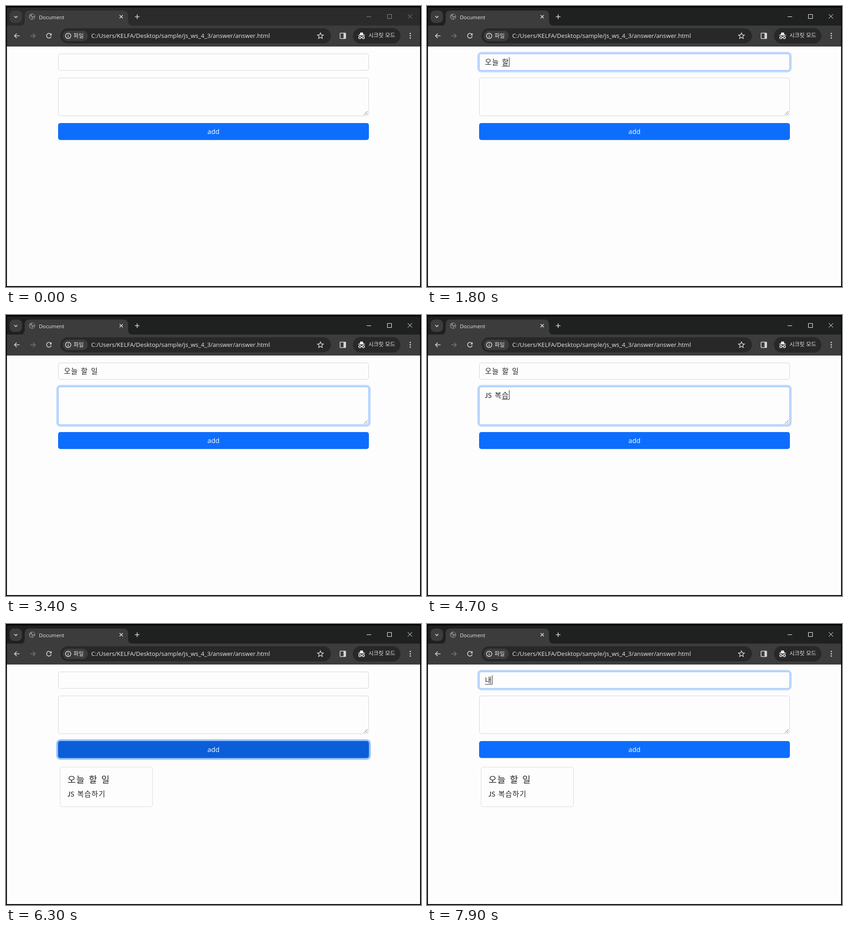
An HTML page that plays this animation: 908 px wide and 617 px high, repeating every 8000 ms.

```html
<!DOCTYPE html>
<html lang="ko">
<head>
<meta charset="utf-8">
<title>Document</title>
<style>
  html, body { margin: 0; width: 100%; height: 100%; overflow: hidden; background: #000; }
  #stage { position: relative; width: 908px; height: 617px; overflow: hidden; background: #000; }
  #view { position: absolute; left: 2px; top: 88px; width: 904px; height: 527px; background: #fdfdfd; }
  #chrome { position: absolute; left: 0; top: 0; }
  #chrome text { font-family: "Open Sans", "Noto Sans CJK KR", sans-serif; fill: #e8e8e8; }
  #chrome .ko { font-family: "Noto Sans CJK KR", "Noto Sans CJK", sans-serif; font-size: 12px; }
  .line { fill: none; stroke: #d6d6d6; stroke-width: 1.6; }

  /* The page is laid out at its natural size and shown slightly reduced. */
  #page { position: absolute; left: 114px; top: 89px; width: 696px; height: 400px;
    transform: scale(.977); transform-origin: 0 0; color: #212529; }
  #page > div { position: absolute; box-sizing: border-box; }
  .field { left: 0; width: 696px; border: 1px solid #ced4da; border-radius: 5px; background: #fdfdfd; padding: 6px 12px; }
  #head { top: 16px; height: 38px; }
  #body { top: 70px; height: 86px; }
  #body svg { position: absolute; right: 0; bottom: 0; }
  #add { left: 0; top: 172px; width: 696px; height: 38px; border-radius: 5px; color: #fff;
    font: 15.1px/24px "Open Sans", sans-serif; text-align: center; padding: 7px 0; }
  #card { left: 4px; top: 230px; width: 208px; height: 90px; border: 1px solid #dadada; border-radius: 5px; padding: 16px; }
  .text { position: relative; top: -.7px; height: 24px; white-space: pre;
    font: 16px/24px "Noto Sans CJK KR", "Noto Sans CJK", sans-serif;
    letter-spacing: .07em; word-spacing: .06em; }
  .text i { font-family: Lato, sans-serif; font-style: normal; letter-spacing: 0; }
  .text u { position: relative; text-decoration: none; display: inline-block; height: 24px; vertical-align: top; }
  .text u::after { content: ""; position: absolute; left: 0; right: 0; top: 22px; height: 1px; background: #212529; }
  .text b { position: relative; display: inline-block; width: 0; height: 24px; vertical-align: top; }
  .text b::after { content: ""; position: absolute; left: 0; top: 2px; width: 1px; height: 21px; background: #111; }
  .big { font-size: 20px; margin-bottom: 8px; }
</style>
</head>
<body>
<div id="stage">
  <div id="view"></div>
  <svg id="chrome" width="908" height="617" viewBox="0 0 908 617">
    <rect id="bar" x="2" y="3" width="904" height="41"/>
    <rect x="2" y="43" width="904" height="46" fill="#3c3c3c"/>
    <rect x="8" y="10" width="27" height="27" rx="9" fill="#3c3c3c"/>
    <path class="line" d="M18 22l3.500 3.500 3.500-3.500"/>
    <path fill="#3c3c3c" d="M31 43q10 0 10-10V20q0-10 10-10H257q10 0 10 10V33q0 10 10 10z"/>
    <circle cx="57" cy="23.500" r="6.700" fill="#80868b"/>
    <path fill="#3c3c3c" d="M52 22l3 1 2 2-1 4-3-2zM57 18l4 1 1 3-3 1-3-2zM59 25l3 0-2 4-2-1z"/>
    <text x="72" y="29" font-size="11.400">Document</text>
    <path class="line" d="M248.500 20l7 7m0-7l-7 7M282 23.500h10m-5-5v10"/>
    <path id="controls" fill="none" stroke-width="1" d="M789 23.500h10M834.500 18.500h9v9h-9zM879 18l9.500 9.500m0-9.500l-9.500 9.500"/>

    <path class="line" d="M29.500 65.500h-11m5-5l-5 5 5 5"/>
    <path class="line" style="stroke:#777" d="M53 65.500h11m-5-5l5 5-5 5"/>
    <path class="line" d="M98 62a5.200 5.200 0 1 0 1 4.500"/>
    <path fill="#d6d6d6" d="M99.800 59.500v5h-5z"/>
    <rect x="119" y="49" width="592" height="33" rx="16.500" fill="#282828"/>
    <rect x="124" y="54" width="55" height="23" rx="11.500" fill="#3c3c3c"/>
    <circle class="line" cx="136" cy="65.500" r="5.800"/>
    <path class="line" d="M136 65v3.800M136 61.800v1.600"/>
    <text class="ko" x="148" y="69.500">파일</text>
    <text x="186.500" y="70" font-size="13.100">C:/Users/KELFA/Desktop/sample/js_ws_4_3/answer/answer.html</text>
    <path class="line" style="stroke-width:1.400" d="M688 59l1.900 4.300 4.600.4-3.500 3.100 1.100 4.600-4.100-2.500-4.100 2.500 1.100-4.600-3.500-3.100 4.600-.4z"/>
    <rect class="line" x="731" y="59.500" width="12" height="12" rx="1"/>
    <path fill="#d6d6d6" d="M738.500 59h5v13h-5z"/>
    <rect x="759" y="48.500" width="104" height="34" rx="17" fill="#282828"/>
    <path fill="#e8e8e8" d="M770.500 64.800h15v-1.500h-3l-1.600-4.600q-.4-.9-1.200-.6l-1.700.5-1.700-.5q-.8-.3-1.200.6l-1.600 4.600h-3z"/>
    <path class="line" style="stroke:#e8e8e8" d="M776.500 69q1.500-1 3 0"/>
    <circle class="line" style="stroke:#e8e8e8" cx="774.200" cy="69.300" r="2.400"/>
    <circle class="line" style="stroke:#e8e8e8" cx="781.800" cy="69.300" r="2.400"/>
    <text class="ko" x="793" y="69.300" font-weight="500">시크릿 모드</text>
    <g fill="#d6d6d6">
      <circle cx="884.500" cy="60.300" r="1.500"/><circle cx="884.500" cy="65.300" r="1.500"/><circle cx="884.500" cy="70.300" r="1.500"/>
    </g>
  </svg>

  <div id="page">
    <div id="head" class="field"><div class="text"></div></div>
    <div id="body" class="field">
      <div class="text"></div>
      <svg width="11" height="11"><path d="M1 9.500L9 1.500M6 9.500L9 6.500" stroke="#555" stroke-width="1"/></svg>
    </div>
    <div id="add">add</div>
    <div id="card">
      <div class="text big">오늘 할 일</div>
      <div class="text"><i>JS</i> 복습하기</div>
    </div>
  </div>
</div>

<script>
const LOOP = 8000, TICK = 100;
const $ = id => document.getElementById(id);
const headText = $('head').querySelector('.text');
const bodyText = $('body').querySelector('.text');

// Keystrokes, one per tick; the part after "|" is still being composed.
const headKeys = ['|ㅇ', '|오', '오|느', '오|늘', '오늘 |', '오늘 |ㅎ', '오늘 |할', '오늘 할 |',
  '오늘 할 |ㅇ', '오늘 할 |이', '오늘 할 |일'];
const latinKeys = ['J|', 'JS|'];
const bodyKeys = ['JS |', 'JS |보', 'JS |복', 'JS 복|스', 'JS 복|습', 'JS 복습|ㅎ', 'JS 복습|하',
  'JS 복습하|ㄱ', 'JS 복습하|기'];

const within = (t, from, to) => t >= from && t < to;
const typed = (keys, since) => keys[Math.min(keys.length - 1, Math.floor(since / TICK))];
const commit = s => s.replace('|', '') + '|';

function headAt(t) {
  if (t >= 7900) return '|내';
  if (t < 1200 || t >= 6200) return '|';
  const s = typed(headKeys, t - 1200);
  return t < 2900 ? s : commit(s);
}

function bodyAt(t) {
  if (t < 3800 || t >= 6200) return '|';
  if (t < 4300) return typed(latinKeys, t - 3800);
  const s = typed(bodyKeys, t - 4300);
  return t < 6100 ? s : commit(s);
}

function markup(s, caret) {
  const [done, open] = s.split('|');
  return done.replace(/[A-Z]+/, '<i>$&</i>') + (open && `<u>${open}</u>`) + (caret ? '<b></b>' : '');
}

// Strength of a focus ring between gaining and losing focus.
const ramp = d => Math.max(0, Math.min(1, (d + 60) / 150));
const focus = (t, on, off) => t < on ? 0 : t < off ? ramp(t - on) : 1 - ramp(t - off);

const mix = (a, b, k) => `rgb(${a.map((v, i) => Math.round(v + (b[i] - v) * k))})`;
const ring = (rgb, alpha, k) => k ? `0 0 0 ${4 * k}px rgba(${rgb},${alpha * k})` : 'none';

function styleField(el, k) {
  el.style.borderColor = mix([206, 212, 218], [134, 183, 254], k);
  el.style.boxShadow = ring('13,110,253', .25, k);
}

function buttonColor(t) {
  if (t < 5800 || t >= 7200) return '#0d6efd';
  if (t < 6100) return '#0a62e0';
  if (t < 6200) return '#0a58ca';
  return t < 7100 ? '#0b5ed7' : '#0c66ea';
}

function draw(t) {
  const active = t >= 500;
  $('bar').setAttribute('fill', active ? '#1f2120' : '#2b2b2b');
  $('controls').setAttribute('stroke', active ? '#fff' : '#8c8c8c');

  styleField($('head'), t < 7100 ? focus(t, 500, 2900) : focus(t, 7100, 9e9));
  styleField($('body'), focus(t, 2900, 6100));
  $('add').style.background = buttonColor(t);
  $('add').style.boxShadow = ring('49,132,253', .5, focus(t, 6100, 7100));
  $('card').style.visibility = t >= 6200 ? 'visible' : 'hidden';

  const headCaret = within(t, 500, 1000) || within(t, 1200, 2600) || within(t, 7100, 7500) || t >= 7900;
  const bodyCaret = within(t, 2900, 3400) || within(t, 3800, 5600);
  headText.innerHTML = markup(headAt(t), headCaret);
  bodyText.innerHTML = markup(bodyAt(t), bodyCaret);
}

let last = -1;
const start = performance.now();
function frame() {
  const t = Math.floor((performance.now() - start) % LOOP / TICK) * TICK;
  if (t !== last) draw(last = t);
  requestAnimationFrame(frame);
}
frame();
</script>
</body>
</html>
```
